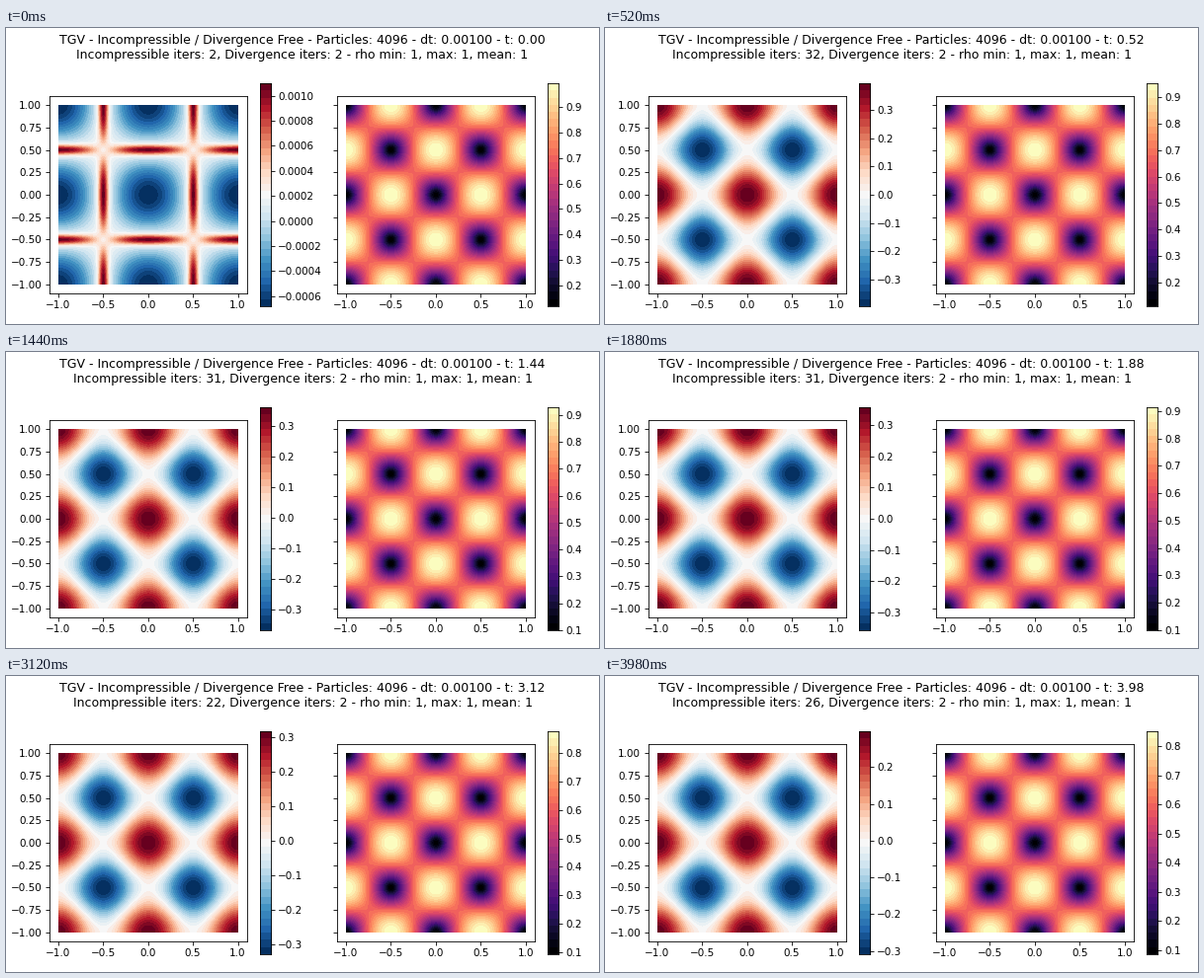
Animation, 600 px wide and 300 px high, one loop 4 s. Source, as a matplotlib script:

```python
import matplotlib.pyplot as plt
import numpy as np
from matplotlib.animation import FuncAnimation

W, H, DPI = 600, 300, 75
FRAMES, STEP_MS = 200, 20
BANDS = 31

# Value ranges and solver iterations over simulated time
TIMES = [0, 0.52, 1.44, 1.88, 2.48, 3.12, 3.98]
P_LOW = [-0.412, -0.394, -0.368, -0.357, -0.340, -0.329, -0.309]
P_HIGH = [0.412, 0.394, 0.361, 0.357, 0.333, 0.317, 0.298]
V_LOW = [0.119, 0.110, 0.0998, 0.0997, 0.0993, 0.093, 0.0865]
V_HIGH = [0.993, 0.953, 0.929, 0.914, 0.899, 0.876, 0.852]
ITERS = [32, 32, 31, 31, 25, 22, 26]
START_RANGE = (-0.00068, 0.0011)

plt.rcParams["font.family"] = "DejaVu Sans"
fig = plt.figure(figsize=(W / DPI, H / DPI), dpi=DPI, facecolor="white")


def add_axes(left, top, width, height):
    return fig.add_axes([left / W, 1 - (top + height) / H, width / W, height / H])


def add_panel(left, cmap):
    """Square field plot with a vertical colour bar beside it."""
    cmap = plt.get_cmap(cmap, BANDS)
    ax = add_axes(left, 69, 200, 200)
    image = ax.imshow(np.zeros((2, 2)), cmap=cmap, vmin=0, vmax=1, origin="lower",
                      extent=(-1, 1, -1, 1), interpolation="nearest")
    ax.set(xlim=(-1.1, 1.1), ylim=(-1.1, 1.1))
    bar_ax = add_axes(left + 212.9, 56, 11.3, 226)
    bar = bar_ax.imshow(np.linspace(0, 1, BANDS)[:, None], cmap=cmap, origin="lower",
                        aspect="auto", interpolation="nearest")
    bar_ax.set_xticks([])
    bar_ax.yaxis.tick_right()
    return ax, image, bar_ax, bar


def set_range(bar_ax, bar, low, high):
    bar.set_extent((0, 1, low, high))
    bar_ax.set(xlim=(0, 1), ylim=(low, high))


def at(t, values):
    return float(np.interp(t, TIMES, values))


# Taylor-Green vortex fields on a regular grid
n = 182
axis = -1 + (np.arange(n) + 0.5) * 2 / n
x, y = np.meshgrid(axis, axis)
cx, cy = np.abs(np.cos(np.pi * x)), np.abs(np.cos(np.pi * y))
sx, sy = np.abs(np.sin(np.pi * x)), np.abs(np.sin(np.pi * y))

speed = np.sqrt((sx * cy) ** 2 + (cx * sy) ** 2 + 0.013)
speed = (speed - speed.min()) / np.ptp(speed)
pressure = (np.cos(2 * np.pi * x) + np.cos(2 * np.pi * y)) / 2


def ridge(c, along):
    return along * np.exp(-(c / (np.pi * 0.055)) ** 2)


start = 0.5 + 0.5 * (ridge(cx, cy) + ridge(cy, cx)) - 0.5 * (cx * cy) ** 1.15

p_ax, p_image, p_bar_ax, p_bar = add_panel(43.6, "RdBu_r")
v_ax, v_image, v_bar_ax, v_bar = add_panel(334.9, "magma")
v_ax.tick_params(labelleft=False)
v_image.set_data(speed)
title = fig.suptitle("")


def draw(i):
    t = i * STEP_MS / 1000
    if i == 0:
        low, high = START_RANGE
        field, iters = start, 2
    else:
        low, high = at(t, P_LOW), at(t, P_HIGH)
        field = (np.where(pressure > 0, high, -low) * pressure - low) / (high - low)
        iters = round(at(t, ITERS))
    p_image.set_data(field)
    set_range(p_bar_ax, p_bar, low, high)
    set_range(v_bar_ax, v_bar, at(t, V_LOW), at(t, V_HIGH))
    title.set_text(
        "TGV - Incompressible / Divergence Free - Particles: 4096"
        f" - dt: 0.00100 - t: {t:.2f}\n"
        f"Incompressible iters: {iters}, Divergence iters: 2"
        " - rho min: 1, max: 1, mean: 1")
    return p_image, p_bar, v_bar, title


anim = FuncAnimation(fig, draw, frames=FRAMES, interval=STEP_MS,
                     repeat=True, repeat_delay=0, blit=False)
plt.show()
```
